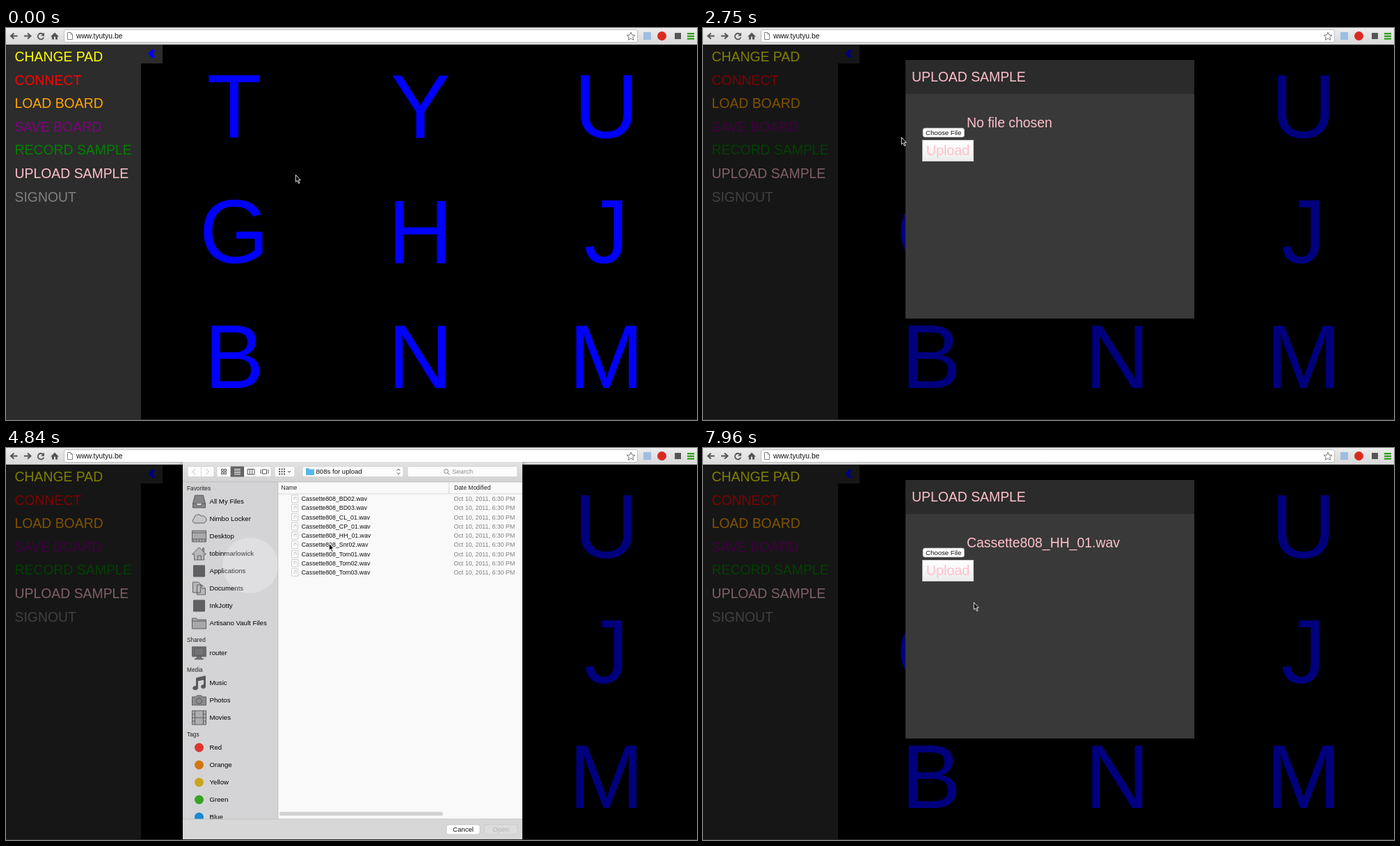
Recreate the animation shown at these times as an HTML page with a canvas. Size 993 by 564 pixels, loop 8000 ms.

```html
<!DOCTYPE html>
<html lang="en">
<head>
<meta charset="utf-8">
<title>Sample pad</title>
<style>
html, body { margin: 0; width: 100%; height: 100%; overflow: hidden; background: #000; }
canvas { display: block; }
</style>
</head>
<body>
<canvas id="stage" width="993" height="564"></canvas>
<script>
const ctx = document.getElementById('stage').getContext('2d');
const LOOP = 8000;
const PINK = '#ffc0cb';

// Stepped tracks: [start time, values...]
const CURSOR = [
  [0, 416, 211], [450, 284, 210], [750, 142, 204], [900, 113, 202],
  [2450, 234, 168], [2750, 285, 157], [2910, 322, 151], [3070, 335, 149],
  [3860, 340, 148], [4070, 347, 148], [4450, 420, 143], [4840, 464, 137],
  [5140, 470, 129], [5300, 476, 125], [5470, 480, 124], [5980, 483, 129],
  [6150, 486, 136], [6330, 711, 476], [6630, 709, 522], [6780, 706, 545],
  [6930, 703, 547], [7250, 695, 549], [7400, 690, 547], [7670, 630, 457], [7960, 389, 222]
];
const DIM = [[0, 0], [1490, .3], [1730, .5]];
const SHEET = [[0, null], [3710, -335], [3860, -70], [4070, 0], [7250, -30], [7400, -270], [7670, null]];

const MENU = [
  ['CHANGE PAD', '#ff0'], ['CONNECT', '#f00'], ['LOAD BOARD', '#ffa500'], ['SAVE BOARD', '#800080'],
  ['RECORD SAMPLE', '#008000'], ['UPLOAD SAMPLE', PINK], ['SIGNOUT', '#808080']
];
const FILES = ['BD02', 'BD03', 'CL_01', 'CP_01', 'HH_01', 'Snr02', 'Tom01', 'Tom02', 'Tom03']
  .map(name => `Cassette808_${name}.wav`);
const PLACES = [
  ['Favorites', [['All My Files', 'tray'], ['Nimbo Locker', 'cloud'], ['Desktop', 'desktop'],
    ['tobinmarlowick', 'home'], ['Applications', 'app'], ['Documents', 'docs'],
    ['InkJotty', 'app'], ['Artisano Vault Files', 'folder']]],
  ['Shared', [['router', 'display']]],
  ['Media', [['Music', 'note'], ['Photos', 'camera'], ['Movies', 'film']]],
  ['Tags', [['Red', '#dc352f'], ['Orange', '#d2770f'], ['Yellow', '#cca31d'], ['Green', '#38a325'],
    ['Blue', '#1788d3'], ['Purple', '#a458bf'], ['Gray', '#8c8c8c']]]
];

// Icons are centred on 0,0: [path, fill]
const ICONS = {
  tray: ['M-6-9H6L9 3V9H-9V3ZM-9 3H-4L-3 6H3L4 3H9', '#858587'],
  cloud: ['M-7 6A4 4 0 0 1-7-1A5.5 5.5 0 0 1 3-4A5 5 0 0 1 7 6Z', '#c6c6c8'],
  desktop: ['M-10-8H10V8H-10ZM-10-5H10M-8 5V7M-4 5V7M0 5V7M4 5V7M8 5V7M-10 4H10', '#aaaaac'],
  home: ['M-10 1L0-9L10 1H7V9H-7V1ZM-2 9V3H3V9M5-4V-8H7V-2', '#b8b8ba'],
  app: ['M-8-8H8V8H-8Z', '#606062'],
  docs: ['M-9-9H-1L2-6V6H-9ZM-3-5H4L9 0V9H-3ZM4-5V0H9', '#b8b8ba'],
  folder: ['M-10-7H-4L-2-5H10V8H-10ZM-10-3H10', '#a8a8aa'],
  display: ['M-10-9H10V5H-10ZM-7-7H7V3H-7ZM-3 5V8H-6V9H6V8H3V5', '#737375'],
  note: ['M-4-7L9-10V5A3 2.5 0 1 1 7 3V-5L-2-3V8A3.5 2.5 0 1 1-4 5Z', '#58585a'],
  camera: ['M-10-5H-5L-3-7H3L5-5H10V7H-10ZM4 1A4 4 0 1 1-4 1A4 4 0 1 1 4 1', '#8c8c8e'],
  film: ['M-10-10H10V10H-10ZM-6-10V10M6-10V10M-6 0H6M-10-5H-6M-10 0H-6M-10 5H-6M6-5H10M6 0H10M6 5H10', '#aeaeb0']
};
const ARROW = 'M.3.3V10.4L2.6 8.3L4.4 12.6L6 11.9L4.2 7.8H7.2Z';
const HAND = 'M3 13L0 8L1 7L3 8V1.5Q4 0 5 1.5V5L9 6.5V10L8 13Z';

function at(track, t) {
  let current = track[0];
  for (const key of track) if (key[0] <= t) current = key;
  return current.slice(1);
}

function rect(x, y, w, h, fill) {
  ctx.fillStyle = fill;
  ctx.fillRect(x, y, w, h);
}

function box(x, y, w, h, radius, fill, border) {
  ctx.beginPath();
  ctx.roundRect(x, y, w, h, radius);
  ctx.fillStyle = fill;
  ctx.fill();
  if (!border) return;
  ctx.strokeStyle = border;
  ctx.lineWidth = .7;
  ctx.stroke();
}

function disc(x, y, r, fill) {
  ctx.beginPath();
  ctx.arc(x, y, r, 0, 7);
  ctx.fillStyle = fill;
  ctx.fill();
}

function text(string, x, y, size, fill, align = 'left', weight = '') {
  ctx.font = `${weight} ${size}px "Liberation Sans", Arial, sans-serif`;
  ctx.textAlign = align;
  ctx.fillStyle = fill;
  ctx.fillText(string, x, y);
}

function path(d, x, y, fill, stroke, width = 1) {
  const shape = new Path2D(d);
  ctx.save();
  ctx.translate(x, y);
  ctx.lineWidth = width;
  if (fill) { ctx.fillStyle = fill; ctx.fill(shape); }
  if (stroke) { ctx.strokeStyle = stroke; ctx.stroke(shape); }
  ctx.restore();
}

function vertical(y0, y1, from, to) {
  const gradient = ctx.createLinearGradient(0, y0, 0, y1);
  gradient.addColorStop(0, from);
  gradient.addColorStop(1, to);
  return gradient;
}

function clip(x, y, w, h) {
  ctx.beginPath();
  ctx.rect(x, y, w, h);
  ctx.clip();
}

function drawBrowser() {
  const ink = '#555';
  rect(0, 0, 993, 24, vertical(0, 24, '#ececec', '#d9d9d9'));
  rect(0, 23, 993, 1, '#bdbdbd');
  path('M5 0H-4M0-4L-4.5 0L0 4', 11.5, 11.5, null, ink, 2);
  path('M-5 0H4M0-4L4.5 0L0 4', 31, 11.5, null, ink, 2);
  path('M3.2-3A4.3 4.3 0 1 0 4.2 1.5', 50, 12, null, ink, 1.8);
  path('M5-5V0H0Z', 50, 11.5, ink);
  path('M-6 1L0-5L6 1H4V5H1V1H-1V5H-4V1Z', 70, 11.5, ink);
  box(83.5, 2.5, 824, 18, 2.5, '#fff', '#aaa');
  path('M-3.5-5H1L3.5-2.5V5H-3.5ZM1-5V-2.5H3.5', 92, 11.5, '#fff', '#777', .9);
  text('www.tyutyu.be', 101, 15.3, 10.3, '#111');
  path('M0-6L1.7-1.9L6-1.7L2.7 1L3.8 5.3L0 3L-3.8 5.3L-2.7 1L-6-1.7L-1.7-1.9Z', 898, 12, '#fff', '#777');
  rect(916, 6, 11, 11, '#9dbde2');
  disc(942.5, 11.5, 6.5, '#d92b22');
  rect(961, 7, 9, 9, '#555');
  for (const y of [7, 10.7, 14.4]) rect(979, y, 10, 2.2, '#2b9b18');
}

function drawPage(t) {
  rect(0, 0, 993, 564, '#000');
  rect(0, 24, 194, 540, '#2c2c2c');
  rect(194, 24, 31, 27, '#2c2c2c');
  path('M0 0L7-7L10.5-4L6.5 0L10.5 4L7 7Z', 204, 37, '#00f');
  const hovered = t >= 750 && t < 2450;
  if (hovered) rect(0, 192, 194, 33.6, '#545454');
  MENU.forEach(([label, color], i) =>
    text(label, 12.5, 48 + i * 33.6, 19.4, hovered && i === 5 ? '#fff' : color));
  ['TYU', 'GHJ', 'BNM'].forEach((row, r) => [...row].forEach((letter, c) =>
    text(letter, 328 + c * 267.4, 158 + r * 179.8, 129, '#00f', 'center')));
  rect(0, 24, 993, 540, `rgba(0,0,0,${at(DIM, t)[0]})`);
  rect(0, 563, 993, 1, '#302828');
}

function drawModal(t) {
  rect(291, 46, 415, 372, '#393939');
  rect(291, 46, 415, 49, '#2b2b2b');
  text('UPLOAD SAMPLE', 300, 77, 19.4, PINK);
  const pressed = t >= 3230 && t < 3710;
  box(316, 144, 59.5, 13, 3, pressed ? '#b9d3f5' : '#fff', '#aaa');
  text('Choose File', 345.7, 153.8, 9.6, '#111', 'center');
  text(t >= 7960 ? FILES[4] : 'No file chosen', 379, 143, 19.4, PINK);
  rect(315, 161, 74, 31, '#ccc');
  rect(316, 162, 72, 29, vertical(162, 191, '#fff', '#ececec'));
  text('Upload', 352, 183, 19.8, PINK, 'center');
}

function drawPlaces(light, showShared) {
  rect(254, 49, 137, 485, light ? '#fbfbfb' : '#d4d4d6');
  ctx.save();
  clip(254, 49, 137, 485);
  let y = 58;
  for (const [heading, items] of PLACES) {
    if (heading === 'Shared' && !showShared) continue;
    text(heading, 260, y + 3, 8.3, '#222');
    y += 19;
    for (const [label, icon] of items) {
      if (icon[0] === '#') {
        disc(277.5, y, 6.5, icon);
        if (light) disc(277.5, y, 6.5, 'rgba(255,255,255,.22)');
      } else {
        path(ICONS[icon][0], 277.5, y, ICONS[icon][1], '#555557', .9);
      }
      text(label, 292.5, y + 3.3, 9.65, '#000');
      y += 25;
    }
    y -= 1;
  }
  ctx.restore();
}

function drawSheetToolbar(listView) {
  rect(254, 20, 488, 29, vertical(20, 49, '#e2e2e2', '#d3d3d3'));
  rect(254, 48.5, 488, .7, '#b4b4b4');
  for (const [x, w] of [[261, 38], [303, 78], [386, 29], [426, 145], [577, 158]])
    box(x, 26.5, w, 15, 2.5, '#fcfcfc', '#ccc');
  rect(280, 27, .7, 14, '#ccc');
  path('M2-4L-2 0L2 4', 270, 34, null, '#bbb');
  path('M-2-4L2 0L-2 4', 289.5, 34, null, '#bbb');
  const selected = listView ? 1 : 2;
  rect(303 + selected * 19.6, 26.5, 19.5, 15, '#646464');
  const glyphs = [
    'M-3.5-3.5H-.7V-.7H-3.5ZM.8-3.5H3.6V-.7H.8ZM-3.5.8H-.7V3.6H-3.5ZM.8.8H3.6V3.6H.8Z',
    'M-4.5-3.5H4.5M-4.5-1H4.5M-4.5 1.5H4.5M-4.5 4H4.5',
    'M-5-3.5H5V4H-5ZM-1.7-3.5V4M1.7-3.5V4',
    'M-3-3H3V3H-3ZM-5.5-3V3M5.5-3V3'
  ];
  glyphs.forEach((d, i) => path(d, 313 + i * 19.5, 34, null, i === selected ? '#fff' : '#555'));
  path('M-4-3.5H-2M-.5-3.5H1.5M3-3.5H5M-4 0H-2M-.5 0H1.5M3 0H5M-4 3.5H-2M-.5 3.5H1.5M3 3.5H5',
    396, 34, null, '#555', 2);
  path('M-2-1L0 1L2-1', 407, 34, null, '#444');
  path('M-2-1.5L0-3.8L2-1.5M-2 1.5L0 3.8L2 1.5', 564, 34, null, '#444');
  if (listView) {
    path('M-6-5H-2L-1-3.5H6V5H-6Z', 437, 34, '#58b7e8');
    text('808s for upload', 445.5, 37.3, 9.6, '#111');
  }
  path('M2 2L4.5 4.5M2.5-.5A3 3 0 1 1-3.5-.5A3 3 0 1 1 2.5-.5', 633, 34, null, '#777');
  text('Search', 641, 37.3, 9.5, '#8c8c8c');
}

function drawFileList(t, hasSelection) {
  rect(391, 49, 351, 485, '#f9f9f9');
  text('Name', 395.5, 60.2, 8.5, '#222');
  text('Date Modified', 644, 60.2, 8.5, '#222');
  rect(391, 65.5, 351, .8, '#cfcfcf');
  rect(636, 50, .8, 15, '#cfcfcf');
  if (t < 4840) return;
  FILES.forEach((name, i) => {
    const y = 73 + i * 13.25;
    const selected = hasSelection && i === 4;
    if (selected) rect(391, y - 6.5, 351, 13.2, '#0b62d6');
    box(410.5, y - 5.3, 9, 10.5, .5, '#fff', '#bbb');
    path('M-1 2V-2L2-2.5V1.5', 415, y, null, '#aaa', .7);
    text(name, 424.5, y + 3.1, 8.8, selected ? '#fff' : '#111');
    text('Oct 10, 2011, 6:30 PM', 643.5, y + 3.1, 8.85, selected ? '#fff' : '#808080');
  });
  if (t < 5300) box(393, 523.5, 235, 5.5, 2.5, '#d2d2d2');
}

function drawSheet(t) {
  const [offset] = at(SHEET, t);
  if (offset === null) return;
  const light = t < 4070;
  const hasSelection = t >= 5640;
  const pressed = t >= 6930 && t < 7090;
  ctx.save();
  clip(0, 20, 993, 544);
  ctx.translate(0, offset);

  ctx.save();
  ctx.shadowColor = 'rgba(0,0,0,.5)';
  ctx.shadowBlur = 8;
  rect(254, 20, 488, 543, '#d6d6d6');
  ctx.restore();

  drawPlaces(light, t >= 4450);
  rect(254, 534, 488, 29, '#d7d7d7');

  // The glow shines through from behind, so it stays put while the sheet slides.
  ctx.save();
  clip(254, 49, 137, 514);
  disc(351, (light ? 172 : 169) - offset, 40, 'rgba(255,255,255,.25)');
  ctx.restore();

  if (t < 4450) {
    rect(391, 49, 351, 485, light ? '#fcfcfc' : '#fff');
    rect(533, 49, .8, 485, '#dedede');
  } else {
    drawFileList(t, hasSelection);
  }
  rect(390.5, 49, .8, 485, '#bcbcbc');
  rect(254, 533.5, 488, .8, '#bcbcbc');
  drawSheetToolbar(t >= 4840);

  box(633, 542, 48, 14, 3, '#fff', '#bbb');
  text('Cancel', 657, 552.3, 9.6, '#111', 'center');
  const blue = pressed ? vertical(542, 556, '#3b8ae0', '#0a50c4') : vertical(542, 556, '#5aaefb', '#0b68f0');
  box(687, 542, 48, 14, 3, hasSelection ? blue : '#dcdcdc', hasSelection ? '#2a76d8' : '#c4c4c4');
  text('Open', 711, 552.3, 9.6, hasSelection ? '#fff' : '#b2b2b2', 'center');
  ctx.restore();
}

function drawCursor(t) {
  const [x, y] = at(CURSOR, t);
  if (t >= 750 && t < 2450) path(HAND, x, y, '#fff', '#222', .9);
  else path(ARROW, x, y, '#000', '#fff', .9);
}

function draw() {
  const t = performance.now() % LOOP;
  drawPage(t);
  drawBrowser();
  if (t >= 2090) drawModal(t);
  drawSheet(t);
  drawCursor(t);
  requestAnimationFrame(draw);
}
draw();
</script>
</body>
</html>
```
